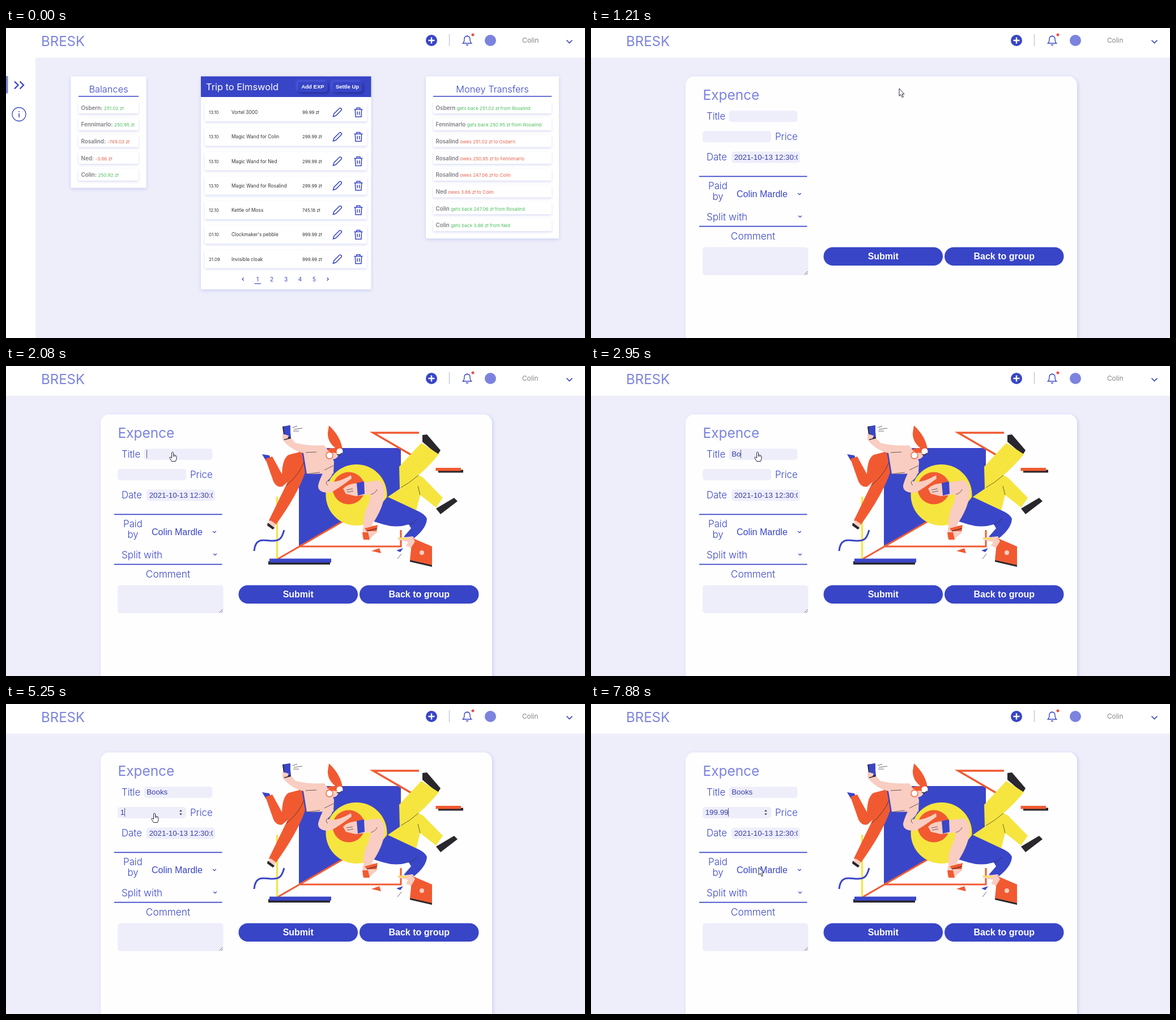
These frames come from a looping animation (1022 by 548 pixels, 8 s). An HTML page with a canvas:

```html
<!DOCTYPE html>
<html lang="en">
<head>
<meta charset="utf-8">
<title>Shared expenses</title>
<style>
html, body { margin: 0; width: 100%; height: 100%; overflow: hidden; background: #eeeefb; }
canvas { display: block; width: 1022px; height: 548px; }
</style>
</head>
<body>
<canvas id="stage"></canvas>
<script>
const LOOP = 8000, W = 1022, H = 548;
const BLUE = '#3845c7', LILAC = '#7b83df', PALE = '#eeeefb', GREY = '#7f7f86';
const GREEN = '#4bbd5c', RED = '#e9604c';
const UI = 'Inter, "Open Sans", sans-serif', FORM = '"Liberation Sans", Arial, sans-serif';
const INK = { red: '#f15a31', yellow: '#f6e53f', pink: '#f9cdc1', black: '#29272c', blue: '#3a46c8' };

const canvas = document.getElementById('stage');
const g = canvas.getContext('2d');
const ratio = window.devicePixelRatio || 1;
canvas.width = W * ratio;
canvas.height = H * ratio;

function text(s, x, y, size, color, { weight = 400, align = 'left', font = UI } = {}) {
  g.font = `${weight} ${size}px ${font}`;
  g.textAlign = align;
  g.fillStyle = color;
  g.fillText(s, x, y);
  return g.measureText(s).width;
}

function label(s, x, y, size = 16.8, align = 'left') {
  text(s, x, y, size, BLUE, { weight: 350, align });
}

function box(x, y, w, h, color, r = 0) {
  g.fillStyle = color;
  g.beginPath();
  g.roundRect(x, y, w, h, r);
  g.fill();
}

function shadowBox(x, y, w, h, color, r, [dx, dy, blur, shade]) {
  g.save();
  g.shadowOffsetX = dx * ratio;
  g.shadowOffsetY = dy * ratio;
  g.shadowBlur = blur * ratio;
  g.shadowColor = shade;
  box(x, y, w, h, color, r);
  g.restore();
}

function disc(x, y, r, color) {
  g.fillStyle = color;
  g.beginPath();
  g.arc(x, y, r, 0, 7);
  g.fill();
}

function fill(d, color) {
  g.fillStyle = color;
  g.fill(new Path2D(d));
}

function line(d, color, width = 1.5) {
  g.strokeStyle = color;
  g.lineWidth = width;
  g.stroke(new Path2D(d));
}

function at(x, y, draw) {
  g.save();
  g.translate(x, y);
  draw();
  g.restore();
}

const card = (x, y, w, h) => shadowBox(x, y, w, h, '#fff', 1, [0, 2, 6, 'rgba(70,80,200,.2)']);
const strip = (x, y, w, h) => shadowBox(x, y, w, h, '#fff', 2, [0, 2, 4, 'rgba(70,80,200,.2)']);

function header(size, base) {
  box(0, 0, W, 52.5, '#fff');
  text('BRESK', 62, 31.5, 24, LILAC);
  disc(751, 22, 10, BLUE);
  line('M745.5 22H756.5M751 16.5V27.5', '#fff', 2.4);
  line('M782.5 11V32', '#b4c0d8', 1.2);
  line('M806.5 27Q809 25 809 19.5Q809 14.5 814 14.5Q819 14.5 819 19.5Q819 25 821.5 27ZM814 14.5V12.8M812 29.2Q814 31.2 816 29.2', BLUE, 1.4);
  disc(824, 12, 2.5, '#ee4f4a');
  disc(855, 22, 10, LILAC);
  text('Colin', 911, base, size, '#85858a');
  line('M989.5 21.5L994.5 26.5L999.5 21.5', BLUE, 1.7);
}

function panelTitle(s, x, w) {
  label(s, x + w / 2, 114, 16.4, 'center');
  box(x, 120, w, 1.5, BLUE);
}

function entry(x, w, i, name, note, color) {
  const y = 141 + i * 29.7;
  strip(x, y - 11, w, 21);
  const used = text(name, x + 4.5, y + 3.5, 9.8, GREY, { weight: 600 });
  text(note, x + 7 + used, y + 3.5, 8.2, color);
}

function balances() {
  card(114.5, 85.5, 133, 197);
  panelTitle('Balances', 128, 106);
  [['Osbern:', '251.02'], ['Fennimarlo:', '250.95'], ['Rosalind:', '-749.03'], ['Ned:', '-3.86'], ['Colin:', '250.92']]
    .forEach(([name, sum], i) => entry(128, 106, i, name, sum + ' zł', sum[0] === '-' ? RED : GREEN));
}

function transfers() {
  card(741, 85.5, 235, 286.5);
  panelTitle('Money Transfers', 754, 209);
  [['Osbern', 'gets back 251.02 zł from Rosalind'],
   ['Fennimarlo', 'gets back 250.95 zł from Rosalind'],
   ['Rosalind', 'owes 251.02 zł to Osbern'],
   ['Rosalind', 'owes 250.95 zł to Fennimarlo'],
   ['Rosalind', 'owes 247.06 zł to Colin'],
   ['Ned', 'owes 3.86 zł to Colin'],
   ['Colin', 'gets back 247.06 zł from Rosalind'],
   ['Colin', 'gets back 3.86 zł from Ned']]
    .forEach(([name, note], i) => entry(754, 209, i, name, note, note[0] === 'o' ? RED : GREEN));
}

function raisedButton(s, x, w) {
  shadowBox(x, 95, w, 18.5, BLUE, 5, [-2, -2, 4, 'rgba(95,108,235,.8)']);
  shadowBox(x, 95, w, 18.5, BLUE, 5, [2, 2, 4, 'rgba(25,32,120,.7)']);
  text(s, x + w / 2, 107.2, 9.5, '#fff', { weight: 700, align: 'center', font: FORM });
}

function pencil() {
  line('M-7.5 7.5L-6 2.5L3.5 -7Q5 -8.3 6.6 -6.7Q8.2 -5 6.8 -3.5L-2.7 6Z', BLUE, 1.5);
}

function trash() {
  line('M-7.5 -5H7.5M-3 -5V-7.7H3V-5M-5.7 -5L-5 8H5L5.7 -5M-1.8 -1.5V4.5M1.8 -1.5V4.5', BLUE, 1.5);
}

function trip() {
  card(344, 85.5, 300.5, 376.5);
  box(344, 85.5, 300.5, 36.5, BLUE);
  text('Trip to Elmswold', 353, 110, 16.4, '#fff');
  raisedButton('Add EXP', 515, 53);
  raisedButton('Settle Up', 576, 53);
  [['13.10', 'Vortel 3000', '99.99'],
   ['13.10', 'Magic Wand for Colin', '299.99'],
   ['13.10', 'Magic Wand for Ned', '299.99'],
   ['13.10', 'Magic Wand for Rosalind', '299.99'],
   ['12.10', 'Kettle of Moss', '745.18'],
   ['01.10', "Clockmaker's pebble", '999.99'],
   ['21.09', 'Invisible cloak', '999.99']].forEach(([day, item, sum], i) => {
    const y = 149 + i * 43.25;
    strip(351, y - 16, 286, 32);
    text(day, 358, y + 3, 7.8, '#333');
    text(item, 398, y + 3, 8.3, '#333');
    text(sum + ' zł', 523, y + 3, 7.8, '#333');
    at(585, y, pencil);
    at(622, y, trash);
  });
  for (let i = 0; i < 5; i++) text(i + 1, 444 + i * 25, 448, 10, BLUE, { align: 'center' });
  box(438.5, 451.3, 11.5, 1.2, BLUE);
  line('M419.5 441.5L417 444L419.5 446.5M566.7 441.5L569.2 444L566.7 446.5', BLUE, 1.2);
}

function dashboard() {
  box(0, 0, W, H, PALE);
  box(0, 52, 52, H, '#fff');
  header(12.3, 26);
  box(0, 85, 3.5, 30.5, LILAC);
  line('M15 94.5L21.5 101L15 107.5M24.5 94.5L31 101L24.5 107.5', BLUE, 2.3);
  line('M35 152.5A12 12 0 1 1 11 152.5A12 12 0 1 1 35 152.5', BLUE, 1.3);
  line('M23 151V158M23 147V148.8', BLUE, 1.6);
  balances();
  trip();
  transfers();
}

function backdrop() {
  fill('M517 145H697V275H594L517 318Z', INK.blue);
  line('M517 319H697V290M480 341L594 275', INK.red, 3);
  line('M715 157L648 118H729', INK.red, 3.4);
  disc(618.5, 228, 54, INK.yellow);
  disc(605, 216, 28.5, INK.red);
  line('M478.5 231V341', INK.yellow, 3.2);
  box(463, 345, 109, 6, INK.black);
  box(465, 340.5, 109, 7, INK.blue);
  box(763, 183.5, 44, 5, INK.black);
  box(758.5, 180, 44.5, 5.5, INK.red);
  line('M438 327C440 303 455 308 467 309C484 310 487 304 491 290', INK.blue, 3);
  fill('M645 327L659 322L662 331Z', INK.red);
  fill('M689 326L701 322L696 329Z', INK.blue);
  line('M691 341L698 332', INK.black, 0.7);
}

function runner() {
  fill('M452 156L465 158L468 166L459 168Z', INK.blue);
  fill('M458 164L470 160L487 191Q488 163 499 157L522 151L528 188Q515 227 476 281L464 273L497 205L488 213Q478 216 472 204Z', INK.red);
  line('M526 170Q517 193 495 211', INK.black, 0.7);
  fill('M467 273L476 279L473 289L462 280Z', INK.pink);
  fill('M462 277L474 286L471 289L461 282Z', INK.black);
  fill('M570 105Q592 126 594 149L584 147Q567 135 568 118Z', INK.red);
  fill('M488 121L499 123L511 136Q537 142 561 140L570 150L579 169L578 190L531 191L525 154Q503 149 488 130Z', INK.pink);
  fill('M577 170Q581 193 567 203Q582 209 609 193L610 199Q589 215 573 224Q550 225 551 211Q554 199 562 184Z', INK.pink);
  line('M529 153L548 152M531 191L554 188M567 203Q563 207 568 211M578 176L562 184', INK.black, 0.7);
  disc(577, 155, 10, INK.pink);
  fill('M566 148Q577 142 588 148L585 154L574 153Z', INK.red);
  disc(571, 158, 6, '#fff');
  disc(589, 151, 5.5, '#fff');
  line('M565 158A6 6 0 1 0 577 158A6 6 0 1 0 565 158', INK.red, 1.3);
  line('M584 156Q588 159 593 154', INK.black, 1.5);
  fill('M488 107L501 105L503 128L491 131Z', INK.black);
  fill('M490 107L502 105L502 126L492 128Z', INK.blue);
  fill('M488 120L499 123L497 128L489 130Z', INK.pink);
  line('M506 109L514 106M508 112L523 110M507 115L517 115', INK.black, 0.7);
}

function tumbler() {
  fill('M735 134L735 122L743 121L767 149L762 157Z', INK.black);
  fill('M759 252L791 233L797 239L767 262Z', INK.black);
  fill('M733 136L764 156Q746 178 728 193L736 197L771 233L759 250L731 228L724 256L673 232L695 217L694 178Z', INK.yellow);
  line('M728 193Q712 207 697 215M731 228L727 212', INK.black, 0.7);
  fill('M673 231L724 255Q739 261 743 270Q742 288 718 306L702 302L715 287L711 280Q689 287 666 280L640 272Z', INK.blue);
  line('M711 280Q720 278 725 270', INK.black, 0.7);
  fill('M595 217Q604 207 623 207L658 202Q671 210 668 229Q665 253 645 282L631 286Q629 264 640 243L644 227L617 230L600 226Z', INK.pink);
  fill('M619 207L632 204L633 226L621 229Z', INK.blue);
  line('M644 227Q652 225 655 218M601 219L612 217M602 223L613 221', INK.black, 0.7);
  fill('M630 286Q641 278 654 283L655 294L640 307L629 303Z', INK.pink);
  fill('M629 294L639 294L642 307L631 307Z', INK.red);
  fill('M633 287L656 281L654 292L637 292Z', INK.red);
  line('M637 292L655 287', INK.black, 1.1);
  fill('M692 304L718 301L723 309L715 321L706 318L710 311L692 307Z', INK.pink);
  line('M692 304L710 306', INK.yellow, 2);
  fill('M717 304L752 319V354L713 343Z', INK.red);
  fill('M713 343L752 352V355L713 346Z', INK.black);
  fill('M708 306L719 305L722 310L714 323Z', INK.pink);
  disc(734, 330, 4, INK.pink);
}

function pill(s, x) {
  box(x, 387.5, 210.5, 32.5, BLUE, 16.25);
  text(s, x + 105.25, 409, 16, '#fff', { weight: 700, align: 'center', font: FORM });
}

function typed(t, times, word) {
  return word.slice(0, times.filter(k => t >= k).length);
}

function input(x, y, s, caret) {
  box(x, y, 121, 20, PALE, 5);
  g.save();
  g.beginPath();
  g.rect(x + 4, y, 113, 20);
  g.clip();
  const w = text(s, x + 4.7, y + 14, 13.33, '#3840a8', { font: FORM });
  g.restore();
  if (caret) box(Math.floor(x + 4.6 + w), y + 2, 1, 15, '#55557c');
}

function form(t) {
  box(0, 0, W, H, PALE);
  header(11.8, 25.5);
  shadowBox(167, 85.5, 691, 500, '#fefeff', 15, [2, 2, 6, 'rgba(70,80,200,.2)']);
  text('Expence', 197.5, 126.5, 24.4, LILAC);

  const inPrice = t >= 4580;
  label('Title', 204, 161.5);
  input(243.5, 146, typed(t, [2620, 2950, 3160, 3290, 3490], 'Books'),
    !inPrice && t >= 2010 && !(t >= 2420 && t < 2620));
  input(197, 182, typed(t, [5250, 5450, 5580, 6190, 6520, 6660], '199.99'),
    inPrice && !(t >= 4980 && t < 5250) && !(t >= 7190 && t < 7390));
  if (inPrice) fill('M306 190L308.5 187L311 190ZM306 193.5L308.5 196.5L311 193.5Z', '#444');
  label('Price', 325, 197.5);
  label('Date', 204, 234);
  input(248, 218.5, '2021-10-13 12:30:00', false);

  box(191, 261.5, 190.5, 1.8, BLUE);
  label('Paid', 224, 285, 16.8, 'center');
  label('by', 224, 304, 16.8, 'center');
  text('Colin Mardle', 257, 299, 16, BLUE, { font: FORM });
  label('Split with', 204, 340, 17.1);
  line('M365.3 292L368 294.7L370.7 292M366.3 331.7L369 334.4L371.7 331.7', BLUE, 1.3);
  box(191, 349.7, 190.5, 1.8, BLUE);
  label('Comment', 286, 373.5, 17.3, 'center');
  box(197, 387.5, 186.5, 49.5, PALE, 5);
  line('M376.5 436L382.5 430M380 436L382.5 433.5', '#66666e', 0.9);
  pill('Submit', 410.5);
  pill('Back to group', 624);

  if (t >= 1350) {
    backdrop();
    tumbler();
    runner();
  }
}

// Pointer stops: time, x, y
const stops = [
  [260, 984, 538], [880, 535, 99], [1020, 544, 107], [1310, 544, 107], [2060, 294, 152],
  [3930, 294, 152], [3960, 291, 149], [4600, 262, 193], [7360, 262, 193], [7880, 296, 289]
];

function pointerAt(t) {
  const i = stops.findIndex(s => s[0] > t);
  if (i < 0) return stops[stops.length - 1].slice(1);
  const [a, b] = [stops[i - 1], stops[i]];
  const k = (t - a[0]) / (b[0] - a[0]), e = k * k * (3 - 2 * k);
  return [a[1] + (b[1] - a[1]) * e, a[2] + (b[2] - a[2]) * e];
}

function overField(x, y) {
  const inside = (l, top) => x > l && x < l + 121 && y > top && y < top + 20;
  return inside(243, 146) || inside(197, 182) || inside(248, 218);
}

function pointer(t) {
  const [x, y] = pointerAt(t);
  const d = t >= 1210 && overField(x, y)
    ? 'M-1.5 1Q0 -1 1.5 1V5.5L3 5.2L4.4 6L5.8 6.2L7 7.6V11.8L5.5 16.5H-1.5L-5.2 10.4Q-5 8.4 -3 9.3L-1.5 10.8ZM1.5 5.5V8.5M4.2 6V8.8'
    : 'M0 0V13.2L3 10.5L5.3 15.6L7.4 14.7L5.2 9.8H9Z';
  at(x, y, () => {
    fill(d, '#fff');
    line(d, '#26263c', 1);
  });
}

function draw(now) {
  const t = now % LOOP;
  g.setTransform(ratio, 0, 0, ratio, 0, 0);
  if (t < 1210) dashboard();
  else form(t);
  if (t >= 260) pointer(t);
}

const start = performance.now();
function tick() {
  draw(performance.now() - start);
  requestAnimationFrame(tick);
}
tick();
</script>
</body>
</html>
```
